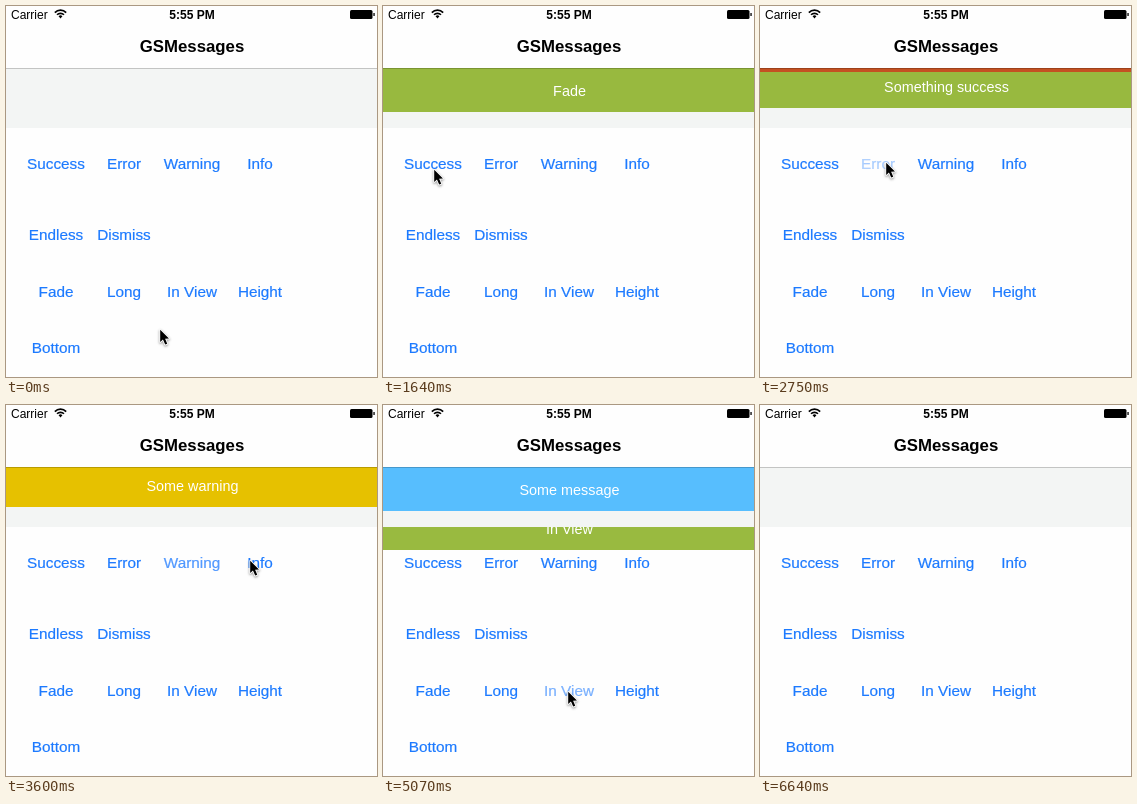
Animation, 371 px wide and 371 px high, one loop 6920 ms. Source, as an HTML page with a canvas:

```html
<!DOCTYPE html>
<html lang="en">
<head>
<meta charset="utf-8">
<title>GSMessages</title>
<style>
html, body { margin: 0; width: 100%; height: 100%; overflow: hidden; background: #fefefe; }
canvas { display: block; width: 371px; height: 371px; }
</style>
</head>
<body>
<canvas id="stage"></canvas>
<script>
const SIZE = 371, LOOP = 6920;
const NAV = 62, VIEW = 122, BAR = 44;
const SLIDE = 300, GLOW = 350;
const FONT = '"Liberation Sans", Arial, sans-serif';
const BLUE = '#1c7aff';
const GREEN = 'rgba(148,183,54,.95)';

const canvas = document.getElementById('stage');
const ctx = canvas.getContext('2d');
const dpr = window.devicePixelRatio || 1;
canvas.width = canvas.height = Math.round(SIZE * dpr);

// label, center x, baseline, press time, release time
const buttons = [
  ['Success', 50, 162.5, 1870, 1980],
  ['Error', 118, 162.5, 2570, 2690],
  ['Warning', 186, 162.5, 3260, 3360],
  ['Info', 254, 162.5, 4010, 4120],
  ['Endless', 50, 233.5],
  ['Dismiss', 118, 233.5, 5990, 6075],
  ['Fade', 50, 290.5, 1120, 1200],
  ['Long', 118, 290.5],
  ['In View', 186, 290.5, 4840, 4915],
  ['Height', 254, 290.5],
  ['Bottom', 50, 346.5]
];

const bars = [
  { text: 'Fade', color: GREEN, show: 1200, hide: 1980, fade: true },
  { text: 'Something success', color: GREEN, show: 1980, hide: 2690 },
  { text: 'Something failed', color: 'rgba(215,38,22,.7)', show: 2690, hide: 3360 },
  { text: 'Some warning', color: '#e6c100', show: 3360, hide: 4120 },
  { text: 'Some message', color: 'rgba(70,184,255,.9)', show: 4120, hide: 6075 }
];
const inView = { text: 'In View', color: GREEN, show: 4915, hide: 6075 };

// time, x, y of the pointer tip
const path = [
  [0, 154, 323], [270, 154, 323], [870, 48, 287], [1260, 48, 287],
  [1640, 51, 163], [1800, 52, 158], [2080, 52, 158], [2500, 126, 156],
  [2780, 126, 156], [3080, 184, 155], [3390, 184, 155], [3590, 244, 155],
  [4160, 244, 155], [4530, 185, 286], [5100, 185, 286], [5520, 144, 241],
  [5560, 144, 241], [5810, 133, 232], [6170, 133, 232], [6620, 150, 376],
  [LOOP, 150, 376]
];

const clamp = v => Math.max(0, Math.min(1, v));
const ease = p => (1 - Math.cos(Math.PI * clamp(p))) / 2;

function rect(x, y, w, h, color) {
  ctx.fillStyle = color;
  ctx.fillRect(x, y, w, h);
}

function label(text, x, y, size, color, weight = '', align = 'center') {
  ctx.font = `${weight} ${size}px ${FONT}`;
  ctx.textAlign = align;
  ctx.fillStyle = color;
  ctx.fillText(text, x, y);
}

function buttonAlpha(t, down, up) {
  if (down === undefined || t < down) return 1;
  return 0.2 + 0.8 * clamp((t - up) / GLOW);
}

function drawButton(t, [text, x, y, down, up]) {
  ctx.globalAlpha = buttonAlpha(t, down, up);
  label(text, x, y, 15.3, BLUE);
  ctx.strokeStyle = BLUE;
  ctx.lineWidth = 0.2;
  ctx.strokeText(text, x, y);
  ctx.globalAlpha = 1;
}

function drawBar(bar, top, t) {
  const shown = ease((t - bar.show) / SLIDE);
  const hidden = ease((t - bar.hide) / SLIDE);
  if (shown === 0 || hidden === 1) return;
  const offset = bar.fade ? 0 : BAR * (1 - shown + hidden);
  // slides land on whole device pixels so the edges stay crisp
  const y = top - Math.round(offset * dpr) / dpr;
  ctx.save();
  ctx.beginPath();
  ctx.rect(0, top, SIZE, BAR);
  ctx.clip();
  if (bar.fade) ctx.globalAlpha = shown * (1 - hidden);
  rect(0, y, SIZE, BAR, bar.color);
  label(bar.text, 186.5, y + 27.5, 14.4, '#fff');
  ctx.restore();
}

function drawWifi() {
  ctx.strokeStyle = ctx.fillStyle = '#000';
  ctx.lineWidth = 1.7;
  for (const r of [4.9, 8]) {
    ctx.beginPath();
    ctx.arc(54.5, 12.2, r, -Math.PI * 0.75, -Math.PI * 0.25);
    ctx.stroke();
  }
  ctx.beginPath();
  ctx.moveTo(54.5, 12.6);
  ctx.arc(54.5, 12.2, 2.7, -Math.PI * 0.75, -Math.PI * 0.25);
  ctx.fill();
}

function drawBattery() {
  ctx.fillStyle = '#000';
  ctx.beginPath();
  ctx.roundRect(344, 4, 22.5, 9, 1.5);
  ctx.fill();
  rect(367.4, 7, 1.3, 3, '#000');
}

function drawNav() {
  rect(0, 0, SIZE, NAV, '#fefefe');
  rect(0, NAV, SIZE, 1, 'rgba(0,0,0,.2)');
  label('Carrier', 5, 12.5, 12, '#000', '', 'left');
  label('5:55 PM', 186, 12.5, 12, '#000', 'bold');
  label('GSMessages', 186, 46, 16.8, '#000', 'bold');
  drawWifi();
  drawBattery();
}

function pointerAt(t) {
  const i = path.findIndex(p => p[0] > t);
  const [t0, x0, y0] = path[i - 1], [t1, x1, y1] = path[i];
  const k = ease((t - t0) / (t1 - t0));
  return [x0 + (x1 - x0) * k, y0 + (y1 - y0) * k];
}

function drawPointer(t) {
  const [x, y] = pointerAt(t);
  ctx.save();
  ctx.translate(x + 0.2, y + 0.8);
  ctx.scale(0.86, 0.86);
  ctx.beginPath();
  ctx.moveTo(0, 0);
  ctx.lineTo(0, 14.2);
  ctx.lineTo(3.2, 11.2);
  ctx.lineTo(5.8, 17.2);
  ctx.lineTo(8.2, 16.2);
  ctx.lineTo(5.7, 10.4);
  ctx.lineTo(10.2, 10.2);
  ctx.closePath();
  ctx.lineJoin = 'round';
  ctx.lineWidth = 2;
  ctx.strokeStyle = '#fff';
  ctx.shadowColor = 'rgba(0,0,0,.45)';
  ctx.shadowBlur = 2.5 * dpr;
  ctx.shadowOffsetY = dpr;
  ctx.stroke();
  ctx.shadowColor = 'transparent';
  ctx.fillStyle = '#000';
  ctx.fill();
  ctx.restore();
}

function draw(t) {
  ctx.setTransform(dpr, 0, 0, dpr, 0, 0);
  rect(0, 0, SIZE, SIZE, '#fefefe');
  rect(0, NAV, SIZE, VIEW - NAV, '#f3f5f4');
  for (const button of buttons) drawButton(t, button);
  drawBar(inView, VIEW, t);
  for (const bar of bars) drawBar(bar, NAV, t);
  drawNav();
  drawPointer(t);
}

const start = performance.now();
function tick() {
  draw((performance.now() - start) % LOOP);
  requestAnimationFrame(tick);
}
tick();
</script>
</body>
</html>
```
